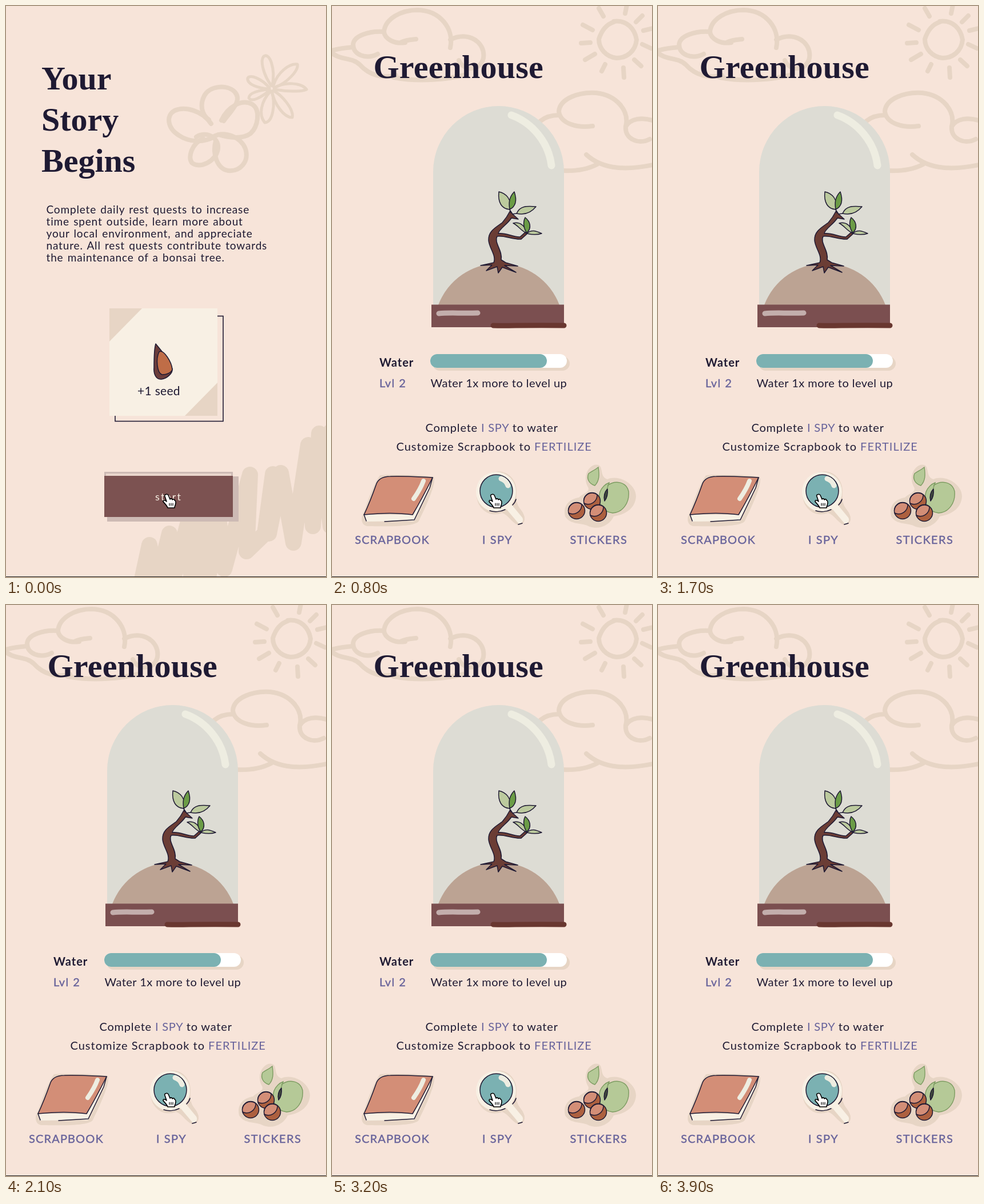
Recreate the animation shown at these times as an HTML page. Size 560x999 px, loop 4000 ms.

```html
<!DOCTYPE html>
<html lang="en">
<head>
<meta charset="utf-8">
<title>Greenhouse</title>
<style>
html, body { margin: 0; width: 100%; height: 100%; overflow: hidden; background: #f7e4d9; }
svg { display: block; width: 560px; height: 999px; }
text { font: 20px Lato, sans-serif; fill: #1f1a33; white-space: pre; }
.title { font: bold 58px "Liberation Serif", serif; }
.para { font-size: 19px; letter-spacing: .85px; word-spacing: 1.5px; }
.link { fill: #68639b; }
.bold { font-weight: 700; }
.label { fill: #68639b; stroke: #68639b; stroke-width: .4; }
.doodle { fill: none; stroke: #e7d5c5; stroke-width: 8; stroke-linecap: round; stroke-linejoin: round; }
.fine { stroke-width: 5; }
.wide { stroke-width: 28; }
.shade { fill: #e7d5c5; }
.ink { stroke: #1f1a33; stroke-width: 1.5; stroke-linejoin: round; stroke-linecap: round; }
.cream { fill: #f8f0e4; }
.bark { fill: #6b3d35; }
.light { fill: #bcca9e; }
.dark { fill: #6b9c46; }
.shine { fill: none; stroke: #eeede1; stroke-linecap: round; }
</style>
</head>
<body>
<svg viewBox="0 0 560 999">
  <rect width="560" height="999" fill="#f7e4d9"/>

  <g id="intro">
    <path class="doodle" d="M355 199C342 190 339 172 347 157C357 139 387 137 400 150C414 165 396 181 381 201"/>
    <path class="doodle" d="M359 206C344 183 313 175 295 183C279 192 283 214 302 226C321 239 346 239 364 229"/>
    <path class="doodle" d="M377 200C388 176 413 162 431 172C446 182 441 211 428 223C413 234 388 230 372 225"/>
    <path class="doodle" d="M333 229C350 218 373 230 371 249C369 272 338 286 325 274C318 263 326 240 345 232"/>
    <path class="doodle" d="M362 229C383 217 412 230 419 250C426 272 410 290 389 288C369 285 361 258 367 236"/>
    <g class="doodle fine">
      <path d="M464 139C451 121 444 96 451 88C461 81 472 108 466 140"/>
      <path d="M468 139C475 116 496 100 510 102C512 113 492 135 469 143"/>
      <path d="M470 143C488 132 517 134 526 146C516 151 488 149 469 146"/>
      <path d="M468 148C484 157 504 181 501 195C486 195 470 172 465 149"/>
      <path d="M463 149C447 166 441 190 453 204C467 203 472 172 465 149"/>
      <path d="M461 148C446 160 430 169 425 161C425 152 443 147 461 146"/>
      <path d="M461 143C446 126 428 120 423 126C421 137 441 144 461 145"/>
    </g>
    <path class="doodle wide" d="M236 1012L251 943L264 1012L286 923L290 1012L318 906L325 1012L345 898L352 1012L372 895L382 985L427 820L421 954L453 923L467 819L460 923L481 817L503 939L529 768L537 910L548 748L568 910V745"/>

    <g id="heading"></g>
    <g id="story"></g>

    <rect x="191" y="542.5" width="189" height="184" fill="none" stroke="#1f1a33" stroke-width="1.6"/>
    <rect class="cream" x="181" y="529" width="189" height="188"/>
    <path class="shade" d="M181 529H238L181 587ZM370 717V659L313 717Z"/>
    <path class="ink" fill="#6b3d3b" d="M262 591C270 601 288 621 291 635C292 643 281 652 272 653C262 654 258 643 259 632C259 615 259 600 262 591Z"/>
    <path class="ink" fill="#bf6d47" d="M268 605C276 600 290 623 291 636C289 642 281 645 273 645C264 642 262 617 268 605Z"/>
    <text x="230" y="681" style="font-size:21px;letter-spacing:.3px">+1 seed</text>

    <rect x="177" y="823" width="230" height="79" fill="#cdbab4"/>
    <rect x="173.5" y="816.5" width="222" height="50" fill="#ead6cd" stroke="#cdbab4" stroke-width="3"/>
    <rect x="172" y="822" width="225" height="72" fill="#7c5251"/>
    <text x="261" y="865" style="font-size:18px;letter-spacing:2.2px;fill:#f8f0e4">start</text>
  </g>

  <g id="home">
    <g class="doodle">
      <path d="M128 64C108 67 92 57 91 45C93 22 121 7 150 7C189 8 214 39 207 73"/>
      <path d="M147 58C138 59 131 59 122 63M91 45C66 43 37 52 37 68C37 86 61 94 80 84"/>
      <path d="M-4 79C13 96 36 89 49 103C66 122 90 127 112 121M37 72C24 73 12 74 -4 79"/>
      <path d="M207 59C238 43 269 63 265 91C259 116 228 113 222 95"/>
      <path d="M108 125C155 134 203 128 235 120"/>
      <path d="M456 210C430 214 399 206 397 184C399 162 432 150 462 152C498 156 521 183 514 211C512 233 537 243 556 233"/>
      <path d="M514 211C522 197 543 193 566 202M397 191C371 191 353 205 353 228"/>
      <path d="M445 260C475 288 520 287 566 277M380 286C415 291 443 288 464 277"/>
      <path d="M493 27C516 24 530 40 533 59C531 80 515 91 498 91C479 89 467 74 467 58C471 45 478 33 493 28"/>
      <path d="M436 65L452 64M439 33L456 42M467 4L475 18M516 -2L513 13M543 17L532 28M545 43L562 39M543 67L558 74M529 94L541 105M510 108L511 125M478 102L472 114M443 94L460 84"/>
    </g>

    <path fill="#dddcd4" d="M177 523V290A114.5 115 0 0 1 406 290V523Z"/>
    <path class="shine" stroke-width="13" d="M314 191C350 204 379 238 384 279"/>
    <path fill="#bca393" d="M186 523A113.5 113.5 0 0 1 398 523Z"/>
    <rect x="174" y="522.5" width="232" height="39.5" fill="#7b4f50"/>
    <path class="shine" style="stroke:#c3aeac" stroke-width="9" d="M187 538C205 536 225 538 255 537"/>
    <path class="shine" style="stroke:#693730" stroke-width="9" d="M282 559C310 560 330 558 406 559"/>

    <g class="ink">
      <path class="bark" d="M260 454L283 449C288 436 275 424 274 410C273 394 287 387 298 379C304 372 308 366 312 358L316 364L326 373L314 371C306 383 292 390 291 398C304 396 318 405 329 404L338 396L341 399L331 408C316 409 302 401 289 403C283 414 299 428 296 444L304 449L325 455L302 454L322 466L298 457L291 467L289 456L270 463L280 453Z"/>
      <path d="M311 356L313 362M316 364L323 363"/>
      <path class="light" d="M292 325C305 328 315 338 311 356C297 355 290 344 292 325Z"/>
      <path class="dark" d="M319 325C323 337 323 350 311 356C309 344 310 334 319 325Z"/>
      <path class="light" d="M323 363C329 349 341 350 357 351C348 362 336 366 323 363Z"/>
      <path class="light" d="M317 380C329 377 339 385 340 397C330 393 326 384 317 380Z"/>
      <path class="dark" d="M338 370C347 377 350 388 341 397C335 389 334 378 338 370Z"/>
      <path class="light" d="M341 398C349 390 358 394 367 398C358 401 349 400 341 398Z"/>
    </g>

    <rect class="shade" x="176" y="613" width="240" height="25" rx="12.5"/>
    <rect x="172" y="609" width="239" height="24" rx="12" fill="#fff"/>
    <rect x="172" y="609" width="204" height="24" rx="12" fill="#7bb1b2"/>

    <path class="shade" d="M84 821C110 819 160 820 178 824C184 835 162 880 152 901C145 913 80 910 62 910C50 908 50 895 56 885C64 862 72 838 84 821Z"/>
    <path class="cream" d="M56 890L141 890L176 825L171 843L143 901L60 902Z"/>
    <path class="ink" fill="none" d="M56 890L60 901M176 825L171 843L144 899L92 902"/>
    <path class="ink" fill="#d38e77" d="M77 838C80 828 89 823 102 823C126 822 151 824 176 825C165 847 154 868 141 890C112 886 84 887 56 890C64 873 71 855 77 838Z"/>
    <path class="shine" stroke-width="8" d="M160 831C156 842 150 852 143 862"/>

    <path class="shade" d="M284 815C305 811 322 826 323 848C323 860 320 868 331 882C342 896 337 909 325 908C314 903 306 888 297 887C270 897 247 872 254 843C258 827 270 817 284 815Z"/>
    <path class="cream" d="M305 880L314 872L333 895Q337 903 327 906Z"/>
    <circle class="cream" cx="287" cy="850" r="35"/>
    <path class="ink" fill="none" d="M276 883C284 886 295 885 303 881M322 863C321 867 319 870 316 873M326 907L333 905"/>
    <circle class="ink" cx="287.5" cy="848.5" r="28.5" fill="#7bb1b2"/>
    <path class="shine" stroke-width="9" d="M296 827C302 829 306 833 308 839"/>

    <path class="shade" d="M445 819C448 807 461 798 469 805C474 813 470 824 482 828C503 819 532 837 532 858C531 879 513 890 493 893C487 907 469 917 451 911C437 903 418 909 408 893C404 876 413 863 432 860C440 852 454 850 447 840C444 834 443 826 445 819Z"/>
    <g stroke="#7c9b61" stroke-width="1.4" fill="#b5c997">
      <path d="M466 807C468 820 468 831 460 839C450 836 445 827 449 818C455 814 461 811 466 807Z"/>
      <path d="M482 839C495 829 515 832 519 849C521 869 509 886 491 887C472 885 464 867 469 850C472 842 479 836 485 834C481 844 479 854 477 866"/>
    </g>
    <path class="ink" fill="#404a3d" d="M482 845C483 854 481 861 477 866C475 857 477 850 482 845Z"/>
    <g id="berries"></g>

    <g id="labels"></g>
  </g>

  <g stroke="#000" stroke-width="1.6" stroke-linejoin="round" stroke-linecap="round">
    <path fill="#fff" d="M279 855C282 853 284 855 285 858L287 863C289 861 291 862 291 864C293 862 295 863 295 865C297 865 297 867 297 869C297 873 295 874 295 878H283C282 874 277 870 275 867C275 864 278 864 281 867L278 858C277 856 278 855 279 855Z"/>
    <path d="M286 870V874M289 870V874M292 870V874" stroke-width="1.2"/>
  </g>
  <rect y="998" width="560" height="1" fill="#222"/>
</svg>

<script>
const NS = "http://www.w3.org/2000/svg";
const $ = id => document.getElementById(id);

function add(parent, tag, attrs, text = "") {
  const el = document.createElementNS(NS, tag);
  for (const key in attrs) el.setAttribute(key, attrs[key]);
  el.textContent = text;
  parent.append(el);
  return el;
}

["Your", "Story", "Begins"].forEach((word, i) =>
  add($("heading"), "text", { class: "title", x: 62, y: 146 + 72 * i }, word));

[
  "Complete daily rest quests to increase",
  "time spent outside, learn more about",
  "your local environment, and appreciate",
  "nature. All rest quests contribute towards",
  "the maintenance of a bonsai tree."
].forEach((line, i) =>
  add($("story"), "text", { class: "para", x: 70.5, y: 363 + 21 * i }, line));

// Text between asterisks takes the link colour.
function label(x, y, gap, text, cls = "") {
  const el = add($("labels"), "text", { x, y, class: cls, "letter-spacing": gap });
  text.split("*").forEach((part, i) => add(el, "tspan", i % 2 ? { class: "link" } : {}, part));
}
label(72.5, 126, .2, "Greenhouse", "title");
label(83, 631, 1, "Water", "bold");
label(83, 667, 1.4, "Lvl 2", "label");
label(172.5, 667, .45, "Water 1x more to level up");
label(163.5, 745, .8, "Complete *I SPY* to water");
label(112.5, 778, 1, "Customize Scrapbook to *FERTILIZE*");
label(40, 941, 1.15, "SCRAPBOOK", "label");
label(263, 941, 1.5, "I SPY", "label");
label(416.5, 941, 1.35, "STICKERS", "label");

[[455, 866], [428, 883], [466, 887]].forEach(([x, y]) => {
  const berry = add($("berries"), "g", { transform: `translate(${x} ${y})` });
  add(berry, "circle", { class: "ink", r: 14.5, fill: "#ad603f" });
  add(berry, "path", { class: "ink", fill: "#d38e77",
    d: "M-14 4A14.5 14.5 0 0 1 9 -11A16 16 0 0 1 -14 4Z" });
});

const LOOP = 4000, START = 800;
function draw() {
  const started = performance.now() % LOOP >= START;
  $("intro").style.display = started ? "none" : "";
  $("home").style.display = started ? "" : "none";
  requestAnimationFrame(draw);
}
draw();
</script>
</body>
</html>
```
